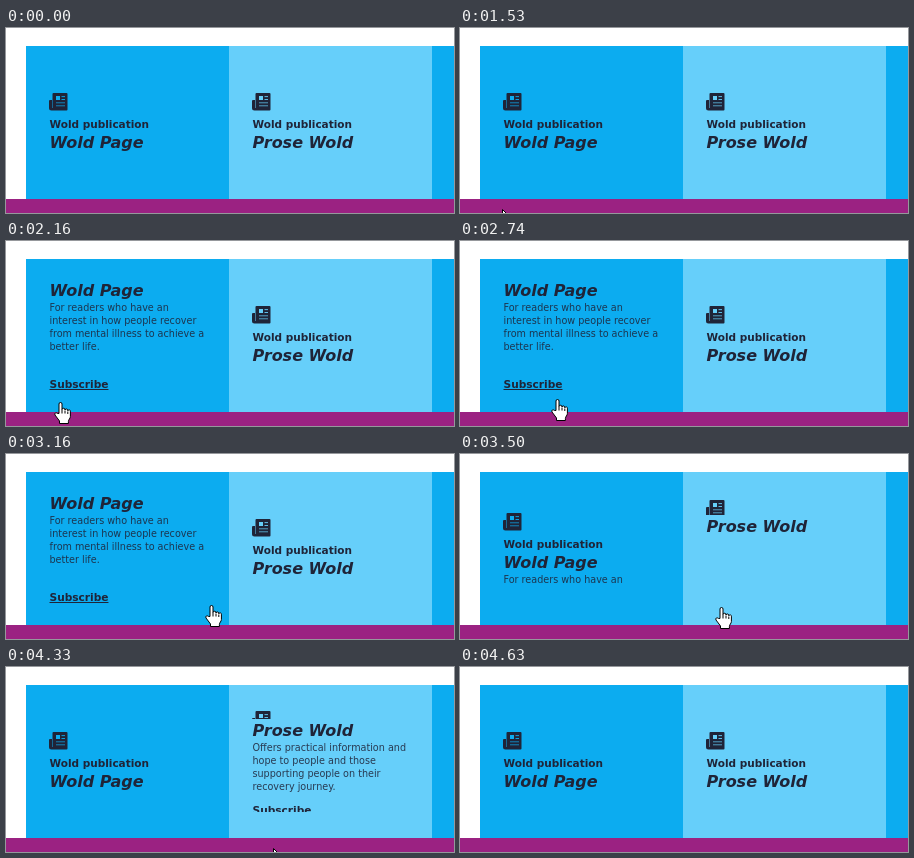
Animation of 448x185 px, one loop 5.09 s. Source, as an HTML page with a canvas:

```html
<!DOCTYPE html>
<html lang="en">
<head>
<meta charset="utf-8">
<title>Publication cards</title>
<style>
  html, body { margin: 0; width: 100%; height: 100%; overflow: hidden; background: #fff; }
  canvas { display: block; }
</style>
</head>
<body>
<canvas id="stage" width="448" height="185"></canvas>
<script>
const ctx = document.getElementById('stage').getContext('2d');
const LOOP = 5090;
const INK = '#1f2438', SOFT = 'rgba(31, 36, 56, .87)';
const BLUE = '#0cacf0', PALE = '#66cffa', PURPLE = '#9b2282';
const FONT = '"DejaVu Sans", Verdana, sans-serif';
const LEFT = 20, TOP = 18, WIDTH = 203, HEIGHT = 153, FLOOR = TOP + HEIGHT;
const MIDDLE = TOP + HEIGHT / 2;
const HEAD = 39, FOLD = 400;

const cards = [
  {
    color: BLUE, title: 'Wold Page', body: 91, link: 92, enter: 1560, leave: 3270,
    lines: ['For readers who have an', 'interest in how people recover',
            'from mental illness to achieve a', 'better life.']
  },
  {
    color: PALE, title: 'Prose Wold', body: 87, link: 85, enter: 3270, leave: 4274,
    lines: ['Offers practical information and', 'hope to people and those',
            'supporting people on their', 'recovery journey.']
  }
];

// The pointer rests between moves.
const home = { x: 42, y: 181 };
const moves = [
  { start: 1530, end: 1690, x: 54, y: 161 },
  { start: 2420, end: 3160, x: 205, y: 151 },
  { start: 3160, end: 3500, x: 261, y: 153 },
  { start: 4000, end: 4440, x: 270, y: 196 }
];

const hand = new Path2D('M-1.5 11V1.5a1.5 1.5 0 0 1 3 0V7a1.4 1.4 0 0 1 3 .5a1.4 1.4 0 0 1 2.8 .8' +
  'a1.3 1.3 0 0 1 2.6 1V14c0 2-2 3-2 5v2H-1V18.5L-5.5 12.5c-1-1.7 1-3 2.4-1.6Z');
const knuckles = new Path2D('M1.5 7v4M4.5 8v3M7.3 9v2.5');
const arrow = new Path2D('M0 0V16L4 12.5 6.5 18 9 17 6.5 11.5H11.5Z');

const clamp = v => Math.max(0, Math.min(1, v));
const mix = (a, b, k) => a + (b - a) * k;

// cubic-bezier(.25, .1, .25, 1), solved by halving
function ease(v) {
  v = clamp(v);
  let lo = 0, hi = 1;
  for (let i = 0; i < 24; i++) {
    const s = (lo + hi) / 2;
    if (0.75 * s * (1 - s) + s ** 3 < v) lo = s; else hi = s;
  }
  const y = 0.3 * lo * (1 - lo) ** 2 + 3 * lo * lo * (1 - lo) + lo ** 3;
  return y > 0.98 ? 1 : y;
}

// The head folds away while the body unfolds; the text fades in afterwards.
function stateOf(card, t) {
  const left = t >= card.leave;
  const open = left ? 1 - ease((t - card.leave) / FOLD) : ease((t - card.enter - 66) / FOLD);
  return {
    hover: t >= card.enter && !left,
    alpha: left ? 1 : clamp((t - card.enter - 480) / 110),
    head: Math.min(HEAD, 54 * (1 - open)),
    body: card.body * open
  };
}

function rect(x, y, w, h, color) {
  ctx.fillStyle = color;
  ctx.fillRect(x, y, w, h);
}

function text(str, x, y, style, color = INK) {
  ctx.font = style + ' ' + FONT;
  ctx.fillStyle = color;
  ctx.fillText(str, x, y);
}

function clipped(x, y, h, draw) {
  if (h <= 0) return;
  ctx.save();
  ctx.beginPath();
  ctx.rect(x, y, WIDTH, h);
  ctx.clip();
  draw();
  ctx.restore();
}

function newspaper(x, y, back) {
  ctx.fillStyle = INK;
  ctx.beginPath();
  ctx.roundRect(x + 3.5, y, 15, 17.5, 1);
  ctx.roundRect(x, y + 7, 5, 10.5, [1, 0, 0, 2.5]);
  ctx.fill();
  rect(x + 3, y + 7, 0.5, 8, back);
  rect(x + 7, y + 3, 4, 4, back);
  for (const dy of [3.2, 6]) rect(x + 12.5, y + dy, 3.5, 0.9, back);
  for (const dy of [9.5, 12.5]) rect(x + 7, y + dy, 9, 0.7, back);
}

function drawCard(card, i, t) {
  const { hover, alpha, head, body } = stateOf(card, t);
  const left = LEFT + WIDTH * i, x = left + 23.5;
  const base = Math.round(MIDDLE + (head - body) / 2 + 5.5);
  const headSize = Math.round(head), top = base - 17 - headSize;
  rect(left, TOP, WIDTH, HEIGHT, card.color);

  clipped(left, top, headSize, () => {
    newspaper(left + 23, top + 1, card.color);
    text('Wold publication', x, top + 36, 'bold 10.5px');
  });
  text(card.title, x, base, 'italic bold 16px');

  clipped(left, base + 4, Math.round(body), () => {
    ctx.globalAlpha = alpha;
    card.lines.forEach((line, n) => text(line, x, base + 15 + 13 * n, '9.65px', SOFT));
    const y = base + Math.round(card.link - (card.body - body) * 0.45);
    text('Subscribe', x, y, 'bold 10.6px');
    if (hover) rect(x, y + 1, ctx.measureText('Subscribe').width, 1, INK);
  });
}

function pointerAt(t) {
  let { x, y } = home;
  for (const m of moves) {
    const k = clamp((t - m.start) / (m.end - m.start)) ** 1.5;
    x = mix(x, m.x, k);
    y = mix(y, m.y, k);
  }
  return { x: Math.round(x), y: Math.round(y) };
}

function drawPointer(t) {
  if (t < moves[0].start) return;
  const { x, y } = pointerAt(t);
  const isHand = y < FLOOR, shape = isHand ? hand : arrow;
  ctx.save();
  ctx.translate(x + 0.5, y + 0.5);
  ctx.fillStyle = '#fff';
  ctx.strokeStyle = '#000';
  ctx.fill(shape);
  ctx.stroke(shape);
  if (isHand) ctx.stroke(knuckles);
  ctx.restore();
}

function draw(t) {
  rect(0, 0, 448, 185, '#fff');
  cards.forEach((card, i) => drawCard(card, i, t));
  rect(LEFT + 2 * WIDTH, TOP, WIDTH, HEIGHT, BLUE);
  rect(0, FLOOR, 448, 14, PURPLE);
  drawPointer(t);
}

const start = performance.now();
function loop() {
  draw((performance.now() - start) % LOOP);
  requestAnimationFrame(loop);
}
loop();
</script>
</body>
</html>
```
